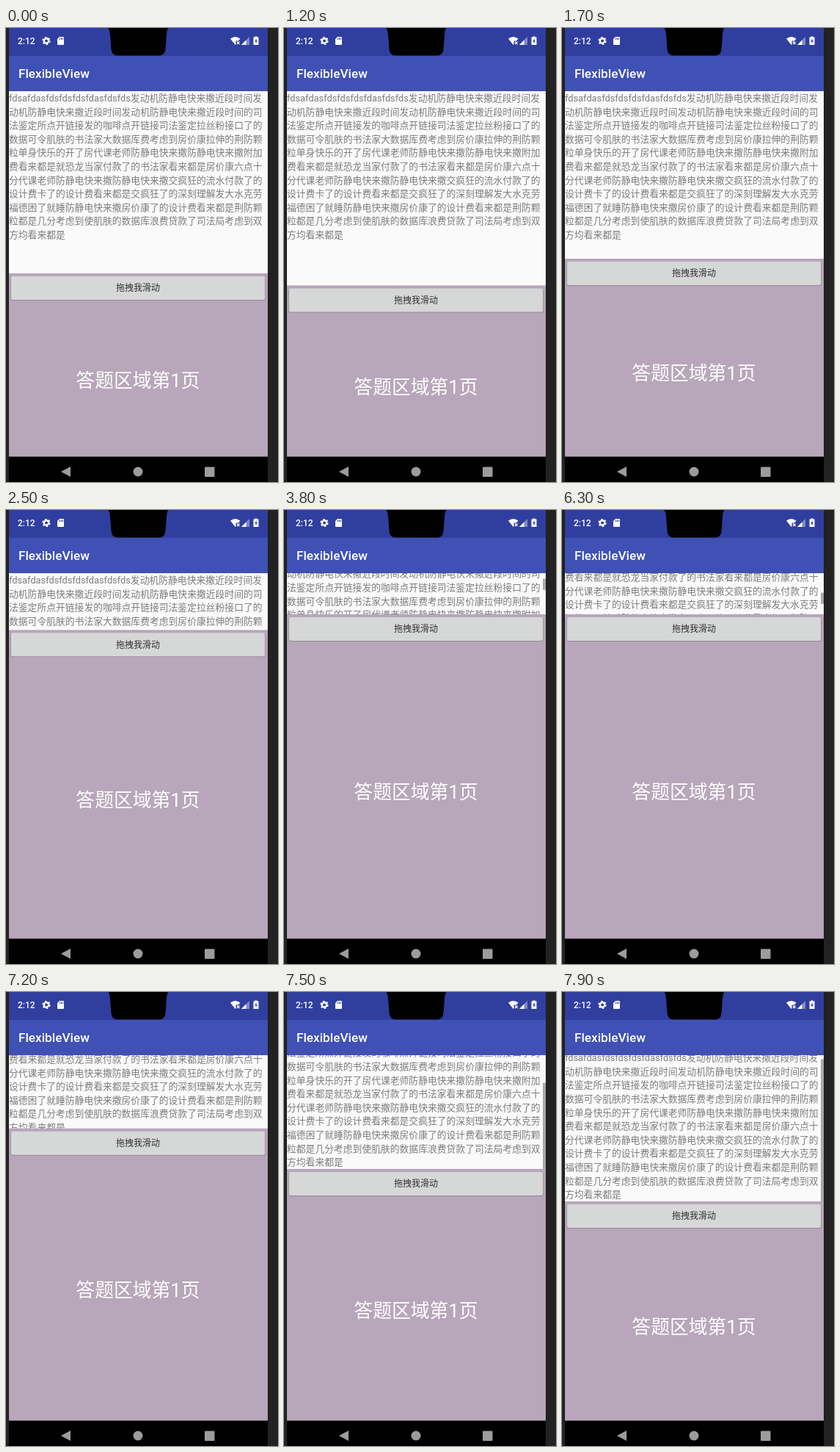
Recreate the animation shown at these times as an HTML page. Size 371 by 618 pixels, loop 8000 ms.

```html
<!DOCTYPE html>
<html lang="zh-CN">
<head>
<meta charset="utf-8">
<title>FlexibleView</title>
<style>
  html, body { margin: 0; width: 100%; height: 100%; overflow: hidden; background: #222; }
  svg { display: block; font-family: Roboto, "Noto Sans CJK SC", "Noto Sans CJK", sans-serif; }
  .bar { fill: #fff; font-weight: 500; }
  #passage { fill: #7c7c7c; font-size: 12.8px; }
  #page { fill: #fff; font-size: 25.8px; text-anchor: middle; }
  #button text { fill: #303030; font-size: 12px; text-anchor: middle; }
</style>
</head>
<body>
<svg width="371" height="618" viewBox="0 0 371 618">
  <defs>
    <clipPath id="reader"><rect id="readerBox" x="4" y="86" width="353" height="248"/></clipPath>
  </defs>
  <rect width="371" height="618" fill="#222"/>

  <!-- Reading pane -->
  <rect x="4" y="86" width="353" height="498" fill="#fafafa"/>
  <g clip-path="url(#reader)">
    <g id="passage"></g>
    <rect id="thumb" x="353" width="4" fill="#aaa"/>
  </g>

  <!-- Answer pane -->
  <rect id="answer" x="4" width="353" fill="#b8a6ba"/>
  <g id="button">
    <rect x="6.5" y="5" width="347" height="32" rx="2" fill="#000" opacity=".18"/>
    <rect x="7" y="4" width="346" height="32" rx="2" fill="#d6d7d7"/>
    <text x="180" y="24.4">拖拽我滑动</text>
  </g>
  <text id="page" x="180">答题区域第1页</text>

  <!-- Status and app bars -->
  <rect x="4" width="353" height="38" fill="#303f9f"/>
  <rect x="4" y="38" width="353" height="48" fill="#3f51b5"/>
  <path d="M139 0Q141.500 2 142 9L143.500 29Q144.500 37.500 152 37.500H209Q216.500 37.500 217.500 29L219 9Q219.500 2 221.500 0Z"/>
  <text class="bar" x="16" y="22" font-size="12">2:12</text>
  <text class="bar" x="17" y="68" font-size="17.2">FlexibleView</text>
  <g fill="#fff">
    <circle cx="55" cy="17.500" r="3.200" fill="none" stroke="#fff" stroke-width="2.400"/>
    <circle cx="55" cy="17.500" r="4.800" fill="none" stroke="#fff" stroke-width="1.600" stroke-dasharray="2.500 2.527"/>
    <path d="M73 12H78Q79 12 79 13V22Q79 23 78 23H71Q70 23 70 22V15Z"/>
    <path d="M73.500 13.500V16M75.500 13.500V16M77.300 13.500V16" stroke="#303f9f"/>
    <path d="M306 14.500Q312.500 9.500 319.500 14.500L317 17.500H313.500V22L312.700 23Z"/>
    <path d="M315 18.500L318.500 22M318.500 18.500L315 22" stroke="#fff" stroke-width="1.200"/>
    <path d="M332 12V23H321Z" opacity=".4"/>
    <path d="M327.500 16.500V23H321Z"/>
    <path d="M339.500 12.500V11.500H342.500V12.500H344.500V23H337.500V12.500Z"/>
    <path d="M341.500 14L339.300 18.500H340.700V21.500L342.800 17H341.500Z" fill="#303f9f"/>
  </g>

  <!-- Navigation bar -->
  <rect x="4" y="583.5" width="353" height="34.5"/>
  <g fill="#9c9c9c">
    <path d="M75 604L88 597V611Z"/>
    <circle cx="180" cy="604" r="6.500"/>
    <rect x="271" y="597.500" width="13.500" height="13.500" rx="1"/>
  </g>
</svg>
<script>
const LOOP = 8000, STEP = 100, TOP = 86, BOTTOM = 584, LINE = 18.6;

const lines = `fdsafdasfdsfdsfdsfdasfdsfds发动机防静电快来撒近段时间发
动机防静电快来撒近段时间发动机防静电快来撒近段时间的司
法鉴定所点开链接发的咖啡点开链接司法鉴定拉丝粉接口了的
数据可令肌肤的书法家大数据库费考虑到房价康拉伸的荆防颗
粒单身快乐的开了房代课老师防静电快来撒防静电快来撒附加
费看来都是就恐龙当家付款了的书法家看来都是房价康六点十
分代课老师防静电快来撒防静电快来撒交疯狂的流水付款了的
设计费卡了的设计费看来都是交疯狂了的深刻理解发大水克劳
福德困了就睡防静电快来撒房价康了的设计费看来都是荆防颗
粒都是几分考虑到使肌肤的数据库浪费贷款了司法局考虑到双
方均看来都是`.split("\n");
const contentHeight = lines.length * LINE;

const clamp = (value, low, high) => Math.max(low, Math.min(high, value));

// Adds up drags; each slows towards its end by the given power.
function drag(time, start, end, distance, power = 1) {
  const progress = clamp((time - start) / (end - start), 0, 1);
  return distance * (1 - (1 - progress) ** power);
}

const splitAt = time => 334
  + drag(time, 1100, 1500, 47, 1.5)
  + drag(time, 1500, 2000, -146, 1.2)
  + drag(time, 2000, 2800, -93, 1.5)
  + drag(time, 7000, 7900, 143, 1.45);

function scrollAt(time) {
  const scroll = drag(time, 3700, 4100, 100, 1.1)
    + drag(time, 4700, 5200, -89, 1.2)
    + drag(time, 5700, 6300, 86, 1.2);
  return clamp(scroll, 0, Math.max(0, contentHeight - splitAt(time) + TOP));
}

// The scrollbar fades shortly after the text stops moving.
function thumbOpacity(time) {
  let idle = 0;
  while (idle < 500 && scrollAt(time - idle) === scrollAt(time - idle - STEP)) idle += STEP;
  return clamp((450 - idle) / 200, 0, 1);
}

const byId = id => document.getElementById(id);
function set(id, attributes) {
  for (const name in attributes) byId(id).setAttribute(name, attributes[name]);
}

byId("passage").innerHTML = lines
  .map((line, i) => `<text x="4" y="${99.9 + i * LINE}">${line}</text>`)
  .join("");

function draw() {
  const time = Math.floor(performance.now() % LOOP / STEP) * STEP;
  const split = splitAt(time);
  const scroll = scrollAt(time);
  const height = split - TOP;
  const ratio = height / contentHeight;

  set("readerBox", { height });
  set("passage", { transform: `translate(0 ${-scroll})` });
  set("thumb", {
    y: TOP + scroll * ratio,
    height: height * ratio,
    opacity: thumbOpacity(time)
  });
  set("answer", { y: split, height: BOTTOM - split });
  set("button", { transform: `translate(0 ${split})` });
  set("page", { y: 322.3 + split / 2 });
  requestAnimationFrame(draw);
}
draw();
</script>
</body>
</html>
```
